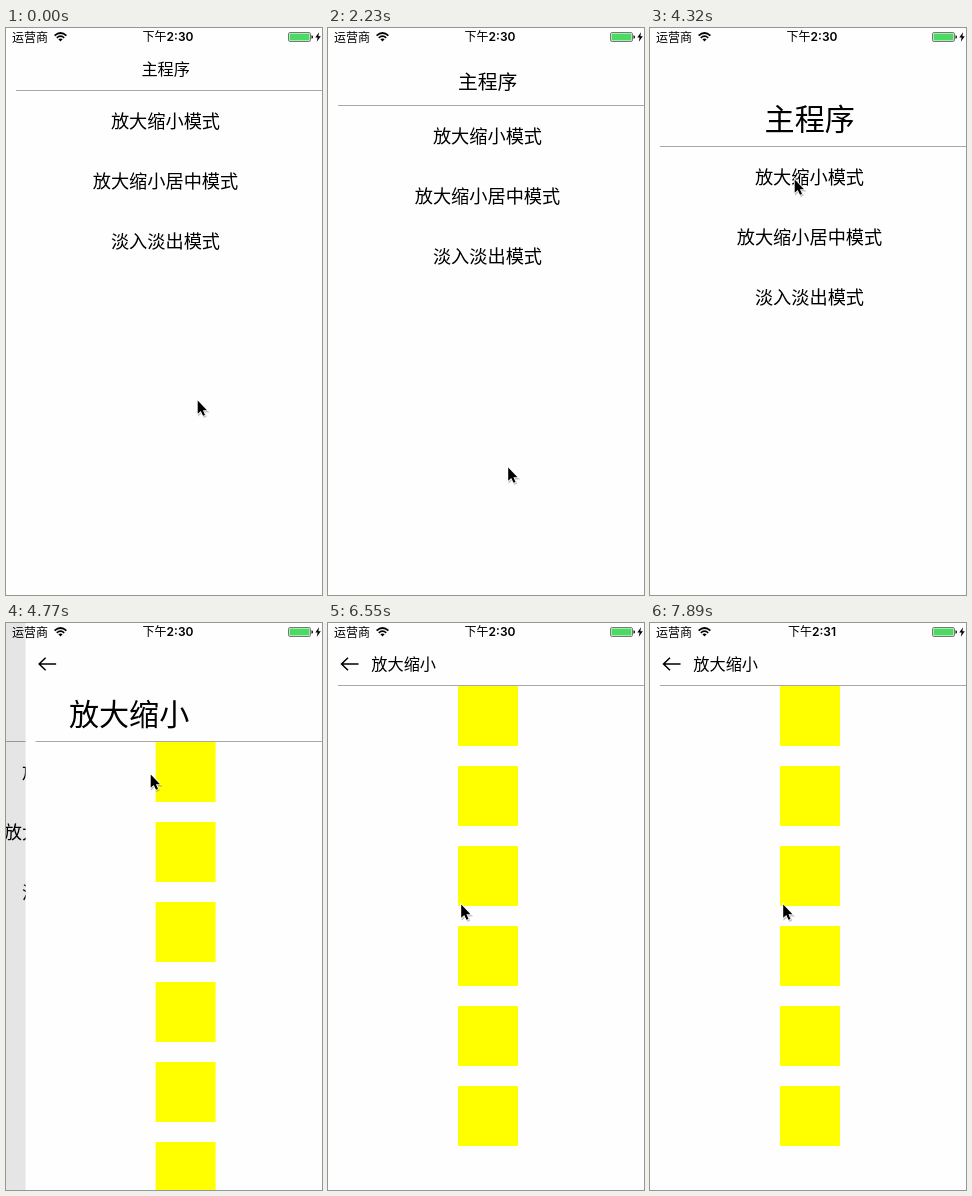
An HTML page that plays this animation: 316 by 567 pixels, repeating every 8000 ms.

```html
<!DOCTYPE html>
<html lang="zh-CN">
<head>
<meta charset="utf-8">
<style>
html, body { margin: 0; width: 100%; height: 100%; overflow: hidden; background: #fefefe; }
svg { display: block; width: 316px; height: 567px; }
text { font-family: "Noto Sans CJK SC", "Noto Sans CJK", sans-serif; font-weight: 300; fill: #000; }
.mid { text-anchor: middle; }
.item { font-size: 18.2px; }
.carrier { font-size: 12px; }
.clock { font: 600 12px Inter, "Noto Sans CJK SC", "Noto Sans CJK", sans-serif; }
.noon { font-weight: 500; }
.rule { fill: #a9a9a9; }
.page { fill: #fefefe; }
</style>
</head>
<body>
<svg viewBox="0 0 316 567">
  <rect class="page" width="316" height="567"/>
  <g id="home">
    <text id="homeTitle" class="mid" x="159.7">主程序</text>
    <g id="homeBody">
      <rect class="rule" x="10" y="62" width="400" height="1"/>
      <text class="item mid" x="159.5" y="100">放大缩小模式</text>
      <text class="item mid" x="159.5" y="160">放大缩小居中模式</text>
      <text class="item mid" x="159.5" y="220">淡入淡出模式</text>
    </g>
  </g>
  <rect id="dim" width="316" height="567"/>
  <g id="detail">
    <rect class="page" width="316" height="567"/>
    <path d="M30.5 41H13.5M20 34.8L13.5 41L20 47.2" fill="none" stroke="#000" stroke-width="1.5"/>
    <text id="detailTitle" x="43.3">放大缩小</text>
    <g id="detailBody">
      <rect class="rule" x="10" y="62" width="306" height="1"/>
    </g>
  </g>
  <g id="status">
    <text class="carrier" x="6" y="13.6">运营商</text>
    <g fill="none" stroke="#000" stroke-width="1.7">
      <path d="M48.6 7.6Q54.5 2.4 60.4 7.6"/>
      <path d="M50.8 9.8Q54.5 6.6 58.2 9.8"/>
    </g>
    <path d="M52.4 11.3Q54.5 9.6 56.6 11.3L54.5 13.4Z"/>
    <text class="clock mid" x="162" y="13.4"><tspan class="noon">下午</tspan><tspan id="clock"></tspan></text>
    <rect x="282.5" y="4.5" width="22" height="9" rx="1.6" fill="#fff" stroke="#555" stroke-width=".8"/>
    <rect x="283.5" y="5.5" width="20" height="7" rx=".6" fill="#4cd964"/>
    <path d="M305.5 7.2Q307 7.5 307 9T305.5 10.8Z"/>
    <path d="M313 4.2L309.3 9.6H311.6L310.8 13.8L314.8 8.2H312.4Z"/>
  </g>
  <g id="cursor">
    <g transform="translate(.7 .4) scale(.93)">
      <path d="M1 1.5V16L4.3 13L6.7 18L8.9 17L6.6 12.2H11Z" opacity=".22" stroke="#000" stroke-width="1.5"/>
      <path d="M0 0V14.4L3.3 11.4L5.7 16.6L7.9 15.6L5.6 10.6H10Z" stroke="#fff" stroke-width="1.6" paint-order="stroke"/>
    </g>
  </g>
</svg>
<script>
const LOOP = 8000, STEP = 148.6, W = 316, TRAVEL = 56;
const PUSH = 30, DRAG = 34, MINUTE = 50;   // in steps
const $ = id => document.getElementById(id);

// pointer stops: step, x, y
const stops = [[0, 191, 372], [8, 182, 487], [13, 179, 400], [17, 180, 478], [22, 177, 183],
  [24, 163, 129], [27, 152, 162], [29, 144, 151], [32, 144, 151], [DRAG, 128.5, 341]];

const ramp = (n, from, to) => {
  const k = Math.min(1, Math.max(0, (n - from) / (to - from)));
  return k * k * (3 - 2 * k);
};

const homeOpen = n => ramp(n, 0, 7) - ramp(n, 10, 13) + ramp(n, 14, 17);
const detailOpen = n => 1 - ramp(n, 37.5, 44) + ramp(n, 44, 48) - ramp(n, 49, 53);

// critically damped spring from 1 to 0
const spring = n => {
  const a = 2.24 * Math.max(0, n - PUSH);
  return (1 + a) * Math.exp(-a);
};

function pointer(n) {
  if (n >= DRAG) return [132.5 - 4 * detailOpen(n), 281 + 60 * detailOpen(n)];
  const i = stops.findIndex(s => s[0] > n);
  const [from, x, y] = stops[i - 1], [to, x2, y2] = stops[i];
  const k = ramp(n, from, to);
  return [x + (x2 - x) * k, y + (y2 - y) * k];
}

const move = (id, x, y) => $(id).setAttribute("transform", `translate(${x} ${y})`);

function header(name, open) {
  const size = 16.2 + 13.9 * open, title = $(name + "Title");
  title.setAttribute("font-size", size);
  title.setAttribute("y", 41 + 49.5 * open + .38 * size);
  move(name + "Body", 0, Math.round(TRAVEL * open));
}

function draw(time) {
  const n = Math.floor((time % LOOP) / STEP), away = spring(n);
  header("home", homeOpen(n));
  header("detail", detailOpen(n));
  move("home", -.3 * W * (1 - away), 0);
  move("detail", W * away, 0);
  $("dim").setAttribute("opacity", .105 * (1 - away));
  $("clock").textContent = n < MINUTE ? "2:30" : "2:31";
  move("cursor", ...pointer(n));
}

for (let i = 0; i < 6; i++) {
  const box = document.createElementNS("http://www.w3.org/2000/svg", "rect");
  const attrs = { x: 130, y: 63 + 80 * i, width: 60, height: 60, fill: "#ff0" };
  for (const key in attrs) box.setAttribute(key, attrs[key]);
  $("detailBody").append(box);
}

const start = performance.now();
function tick() {
  draw(performance.now() - start);
  requestAnimationFrame(tick);
}
draw(0);
requestAnimationFrame(tick);
</script>
</body>
</html>
```
